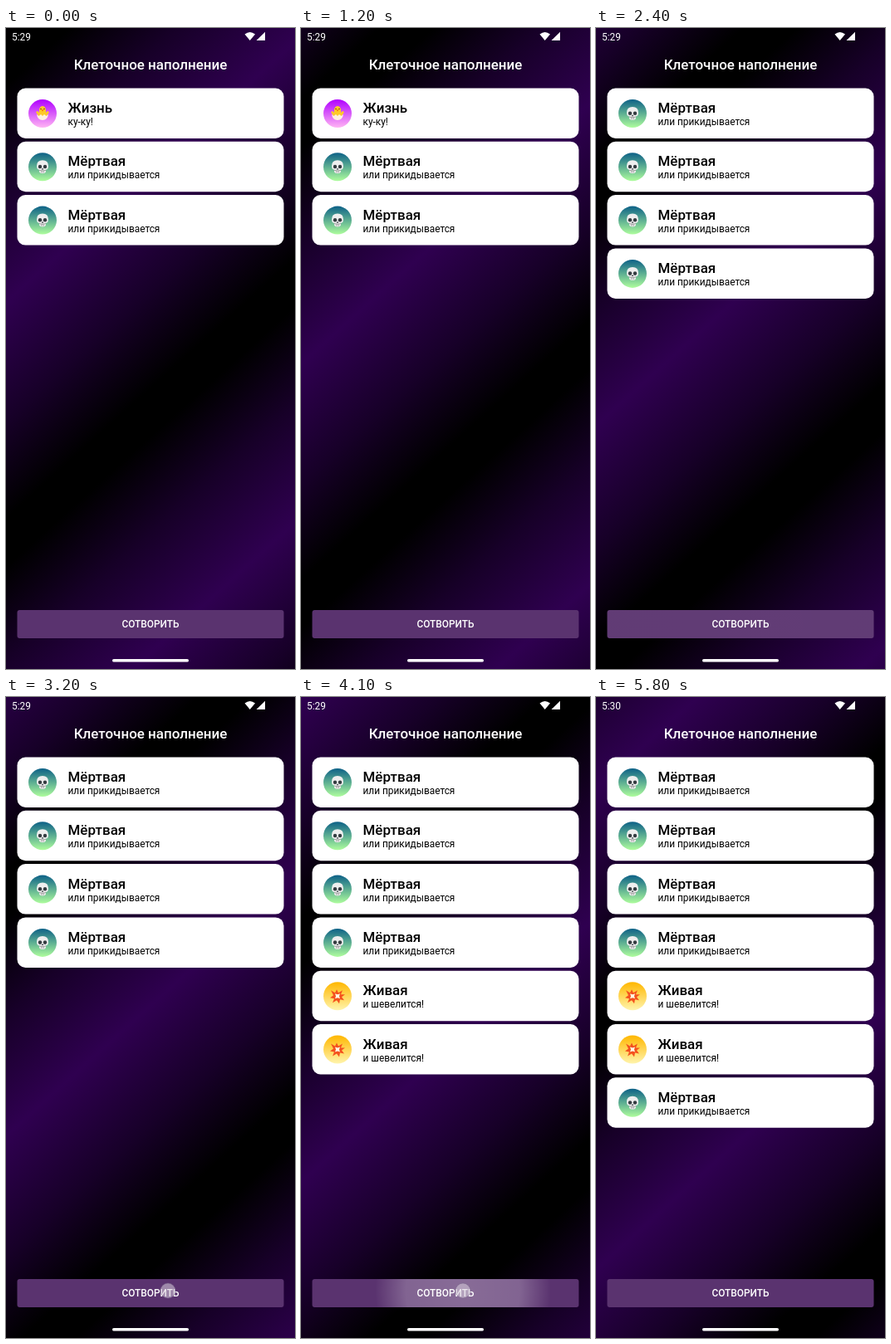
Animation of 348x772 px, one loop 5.9 s. Source, as an HTML page:

```html
<!DOCTYPE html>
<html lang="ru">
<head>
<meta charset="utf-8">
<style>
html, body { margin: 0; width: 100%; height: 100%; overflow: hidden; background: #000; }
svg { display: block; width: 348px; height: 772px; font: 11.86px Roboto, sans-serif; fill: #fff; }
.big { font-size: 16.94px; font-weight: 500; }
.mid { text-anchor: middle; font-weight: 500; }
.row text { fill: #000; }
</style>
</head>
<body>
<svg viewBox="0 0 348 772">
  <defs>
    <linearGradient id="sky" gradientUnits="userSpaceOnUse" x1="0" y1="0" x2="144" y2="160" spreadMethod="reflect">
      <stop stop-color="#2f0050"/><stop offset=".5" stop-color="#170028"/><stop offset=".9" stop-color="#000"/>
    </linearGradient>
    <linearGradient id="life-bg" x2="0" y2="1"><stop stop-color="#b000ff"/><stop offset="1" stop-color="#ffb4f4"/></linearGradient>
    <linearGradient id="dead-bg" x2="0" y2="1"><stop stop-color="#0d6187"/><stop offset="1" stop-color="#aefd9d"/></linearGradient>
    <linearGradient id="live-bg" x2="0" y2="1"><stop stop-color="#ffb700"/><stop offset="1" stop-color="#fff4ac"/></linearGradient>
    <radialGradient id="glow">
      <stop stop-color="#fff" stop-opacity=".28"/><stop offset=".65" stop-color="#fff" stop-opacity=".24"/>
      <stop offset="1" stop-color="#fff" stop-opacity="0"/>
    </radialGradient>
    <clipPath id="face"><rect x="13.5" y="701" width="321" height="34" rx="3"/></clipPath>

    <g id="life">
      <path d="M-7 0Q-9-2-6-3L-4-1-4-5Q-3-9 0-9T4-5L4-1 6-3Q9-2 7 0L4 4H-4Z" fill="#ffc928"/>
      <path d="M-1.500-4.500H1.500L0-2.500Z" fill="#ef6c00"/>
      <g fill="#493500"><circle cx="-2" cy="-5.500" r=".7"/><circle cx="2" cy="-5.500" r=".7"/></g>
      <path d="M-7 1L-4.500 3-2 1 0 3 2 1 4.500 3 7 1Q6 8 0 8T-7 1Z" fill="#fff2df"/>
    </g>
    <g id="dead">
      <path d="M-7-1Q-7-8 0-8T7-1Q7 3 4 3.500V6Q3 8 0 8T-4 6V3.500Q-7 3-7-1Z" fill="#eeeeee"/>
      <path d="M-4 4Q0 5.500 4 4" fill="none" stroke="#777" stroke-width=".7"/>
      <g fill="#343b40"><ellipse cx="-3" cy="-.3" rx="2.200" ry="2.300"/><ellipse cx="3" cy="-.3" rx="2.200" ry="2.300"/><path d="M0 1.200L1.300 3.200H-1.300Z"/></g>
      <path d="M-1.500 5V7M0 5V7.500M1.500 5V7" stroke="#888" stroke-width=".5"/>
    </g>
    <g id="live">
      <path id="burst" d="M-8-7L-3-4-1-8 1-4 6-7 4-2 9-2 5 1 8 5 3 4 2 9-1 5-6 8-4 3-9 2-5-1Z" fill="#f4511e"/>
      <use href="#burst" transform="scale(.65)" style="fill:#ffb300"/>
      <path d="M-3-3L0-2 3-3 2 0 3 3 0 2-3 3-2 0Z" fill="#fff8e1"/>
    </g>
  </defs>

  <rect width="348" height="772" fill="url(#sky)"/>
  <text id="clock" x="7" y="15"></text>
  <path d="M287.500 7.500Q293.700 2.500 300 7.500L293.700 15ZM301.500 15L312 4.700V15Z"/>
  <text class="big mid" x="174" y="49.700">Клеточное наполнение</text>
  <g id="list"></g>
  <rect x="13.500" y="701" width="321" height="34" rx="3" fill="#5a336f"/>
  <g clip-path="url(#face)"><circle id="ripple" fill="url(#glow)"/></g>
  <text class="mid" x="174" y="722.300">СОТВОРИТЬ</text>
  <circle id="touch" r="9" fill="#d8cfdd" fill-opacity=".55" stroke="#78648a" stroke-opacity=".5"/>
  <rect x="128" y="760" width="92" height="3.500" rx="1.750"/>
</svg>
<script>
const $ = id => document.getElementById(id);
const LOOP = 5900, PITCH = 64.3;
const cells = {
  life: ['Жизнь', 'ку-ку!'],
  dead: ['Мёртвая', 'или прикидывается'],
  live: ['Живая', 'и шевелится!']
};
const added = [[1800, 'dead'], [3400, 'live'], [4000, 'live'], [4600, 'dead']];
const presses = [[1800, 203, 717], [3200, 195, 715], [3850, 195, 715], [4500, 195, 715]];
const clamp = v => Math.max(0, Math.min(1, v));

function row(kind, i) {
  const [title, note] = cells[kind];
  return `<g class="row" transform="translate(13.5 ${72.5 + i * PITCH})">
    <rect width="321" height="60.5" rx="10"/>
    <circle cx="30.5" cy="30.5" r="17" fill="url(#${kind}-bg)"/>
    <use href="#${kind}" transform="translate(30.5 30.5)"/>
    <text class="big" x="61" y="29.5">${title}</text>
    <text x="61" y="44.5">${note}</text></g>`;
}

let shown = '';
function drawList(t) {
  const kinds = [t < added[0][0] ? 'life' : 'dead', 'dead', 'dead'];
  for (const [at, kind] of added) if (t >= at) kinds.push(kind);
  const key = kinds.join();
  if (key !== shown) $('list').innerHTML = kinds.map(row).join('');
  shown = key;
}

function place(el, x, y, opacity) {
  el.setAttribute('cx', x);
  el.setAttribute('cy', y);
  el.setAttribute('opacity', opacity);
}

function drawPress(t) {
  const [at, x, y] = presses.filter(p => p[0] <= t).pop() || [-LOOP, 195, 715];
  const dt = t - at;
  place($('touch'), x, y, clamp((400 - dt) / 150));
  place($('ripple'), x, y, clamp((650 - dt) / 300));
  $('ripple').setAttribute('r', dt ? 12 + 1500 * (Math.min(dt, 500) / 1000) ** 2 : 0);
}

function frame(now) {
  const t = Math.floor(now % LOOP / 100) * 100;
  $('sky').setAttribute('gradientTransform', `translate(0 ${330 + t * .062})`);
  $('clock').textContent = t < 4500 ? '5:29' : '5:30';
  drawList(t);
  drawPress(t);
  requestAnimationFrame(frame);
}
frame(0);
</script>
</body>
</html>
```
